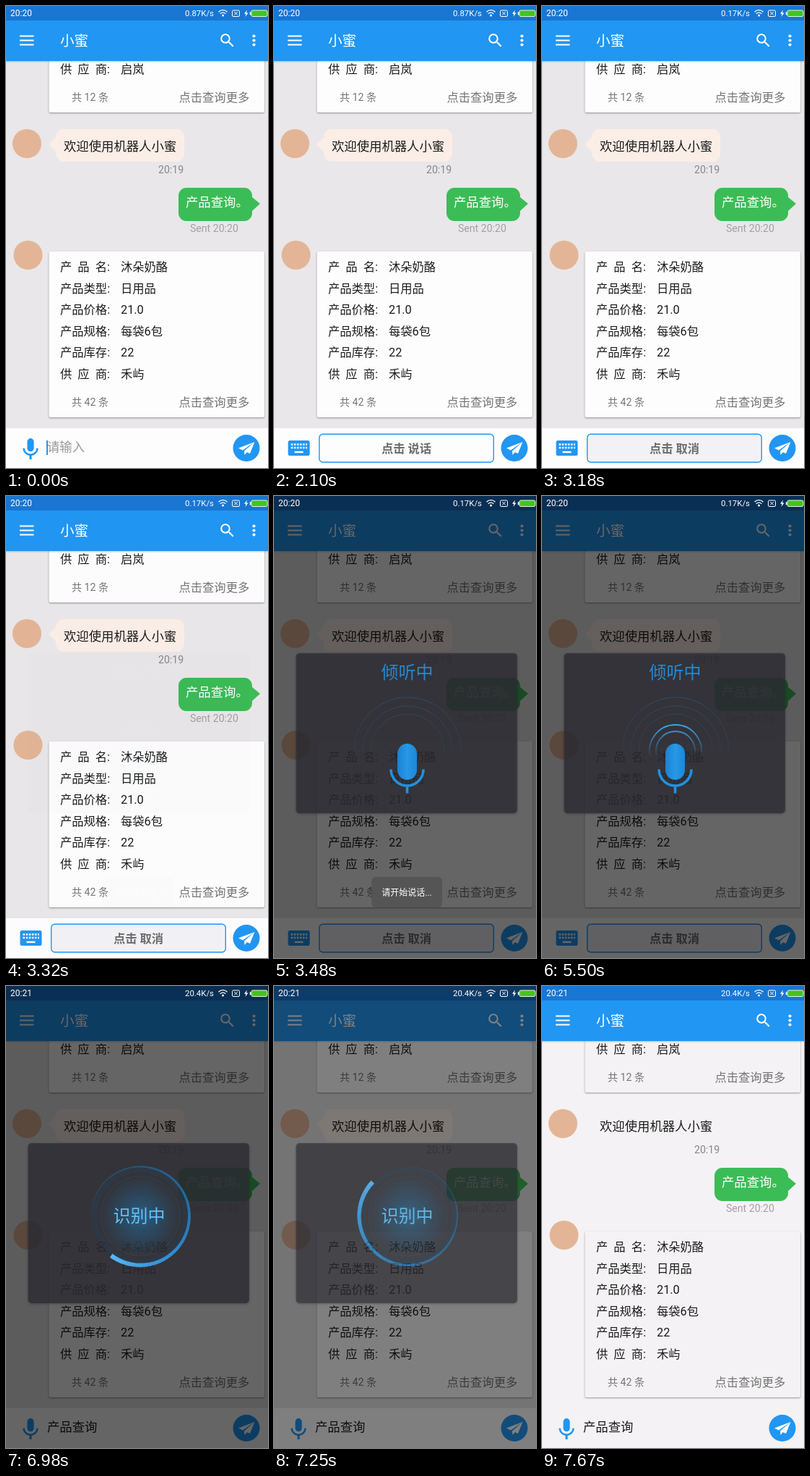
These frames come from a looping animation (363x638 px, 8000 ms). An HTML page:

```html
<!DOCTYPE html>
<html lang="zh-CN">
<head>
<meta charset="utf-8">
<title>小蜜</title>
<style>
html, body { margin: 0; width: 100%; height: 100%; overflow: hidden; }
svg { display: block; --bg: #e9e7e9; --card: #fdfdfe; --bubble: #faeee7; }
svg.pale { --bg: #f4f2f4; --card: #f4f2f4; --bubble: #f4f2f4; }
text { font: 16.3px Roboto, "Noto Sans CJK SC", "Noto Sans CJK", sans-serif; fill: #1c1c1c; white-space: pre; }
.bg { fill: var(--bg); }
.card { fill: var(--card); }
.cards { filter: drop-shadow(0 1px 1px rgba(0,0,0,.38)); }
.bubble { fill: var(--bubble); }
.grey { fill: #757575; }
.s14 { font-size: 14.1px; }
.s17 { font-size: 17.35px; }
.mid { text-anchor: middle; }
.blue { fill: #2196f3; }
.white { fill: #fff; }
.stat { font-size: 12px; fill: #fff; }
.head { font-size: 24px; font-weight: 300; }
.line { fill: none; stroke: #fff; }
</style>
</head>
<body>
<svg id="stage" width="363" height="638" viewBox="0 0 363 638">
  <defs>
    <linearGradient id="micFill"><stop stop-color="#1c80d0"/><stop offset=".5" stop-color="#2798e6"/><stop offset="1" stop-color="#1c86d8"/></linearGradient>
    <linearGradient id="fadeIn" gradientUnits="userSpaceOnUse" x1="0" y1="314" x2="0" y2="362"><stop stop-color="#3fa8ee"/><stop offset="1" stop-color="#3fa8ee" stop-opacity="0"/></linearGradient>
    <linearGradient id="fadeOut" gradientUnits="userSpaceOnUse" x1="0" y1="277" x2="0" y2="356"><stop stop-color="#1f6cab"/><stop offset="1" stop-color="#1f6cab" stop-opacity=".3"/></linearGradient>
    <radialGradient id="glow"><stop stop-color="#2383c4" stop-opacity=".55"/><stop offset=".5" stop-color="#1f6b9f" stop-opacity=".35"/><stop offset="1" stop-color="#1f6b9f" stop-opacity="0"/></radialGradient>
  </defs>

  <rect class="bg" width="363" height="638"/>
  <g class="cards">
    <rect class="card" x="59.5" y="60" width="298.5" height="87" rx="2"/>
    <rect class="card" x="59.5" y="339" width="298.5" height="229" rx="2"/>
  </g>
  <g id="rows"></g>

  <g fill="#e3b596"><circle cx="29" cy="190" r="20"/><circle cx="30.5" cy="344" r="20"/></g>
  <path class="bubble" d="M80 170H236a11 11 0 0 1 11 11V204a11 11 0 0 1-11 11H80a11 11 0 0 1-11-11V201L59 191L69 181a11 11 0 0 1 11-11Z"/>
  <text class="s17" x="80" y="200">欢迎使用机器人小蜜</text>
  <text class="s14" x="211" y="231" style="fill:#888">20:19</text>
  <path fill="#3cbc56" d="M250 251H330a11 11 0 0 1 11 11V264L352 273L341 283V286a11 11 0 0 1-11 11H250a11 11 0 0 1-11-11V262a11 11 0 0 1 11-11Z"/>
  <text class="s17 white" x="249" y="277">产品查询。</text>
  <text class="s14" x="255" y="312" style="fill:#a2a0a2">Sent 20:20</text>

  <g style="filter:drop-shadow(0 1px 1px rgba(0,0,0,.2))"><rect class="blue" width="363" height="76"/></g>
  <rect width="363" height="20" fill="#1976d2"/>
  <path class="line" stroke-width="2.2" d="M19 41.5H38.5M19 47.5H38.5M19 53.5H38.5"/>
  <text class="white" x="75" y="54.5" style="font-size:19.6px">小蜜</text>
  <path class="white" transform="translate(294 35) scale(1.05)" d="M15.5 14h-.79l-.28-.27A6.5 6.5 0 0 0 16 9.5 6.5 6.5 0 1 0 9.5 16c1.61 0 3.09-.59 4.23-1.57l.27.28v.79l5 4.99L20.49 19zm-6 0a4.5 4.5 0 1 1 0-9 4.5 4.5 0 0 1 0 9z"/>
  <g class="white"><circle cx="343.5" cy="41.5" r="2.1"/><circle cx="343.5" cy="47.5" r="2.1"/><circle cx="343.5" cy="53.5" r="2.1"/></g>

  <rect class="card" y="583" width="363" height="55"/>
  <g id="typeBar">
    <path class="blue" transform="translate(15.8 594) scale(1.52)" d="M12 14a3 3 0 0 0 3-3V5a3 3 0 0 0-6 0v6a3 3 0 0 0 3 3zm5.3-3c0 3-2.54 5.1-5.3 5.1S6.7 14 6.7 11H5c0 3.41 2.72 6.23 6 6.72V21h2v-3.28c3.28-.48 6-3.3 6-6.72z"/>
    <text id="field" class="s17" x="57" y="615"></text>
    <rect id="caret" class="blue" x="56" y="600" width="2" height="20"/>
  </g>
  <g id="talkBar">
    <rect class="blue" x="19.5" y="600" width="30" height="21" rx="2.5"/>
    <path class="line" stroke-width="2.6" stroke-dasharray="2.6 1.5" d="M23.5 605.5H46M23.5 610H46"/>
    <path class="line" stroke-width="2.4" d="M28.5 616H40.5"/>
    <rect id="button" x="62.7" y="591.2" width="241.6" height="38.8" rx="5" stroke="#2196f3" stroke-width="1.4"/>
    <text id="label" class="mid" x="183.5" y="616.5" style="font-weight:600;fill:#6c6c6c"></text>
  </g>
  <circle class="blue" cx="333" cy="610.5" r="18.5"/>
  <path class="white" d="M344.5 602L322 610.5L328 613.5ZM344.5 602L330 614.5L330.5 620L333.8 616.3L338 618Z"/>

  <rect id="dim" width="363" height="638"/>

  <text id="clock" class="stat" x="6" y="14.3"></text>
  <text id="speed" class="stat" x="288" y="14.3" text-anchor="end" style="font-size:11.4px"></text>
  <path class="line" stroke-width="1.3" d="M294.5 8.2a8.5 8.5 0 0 1 12 0M296.7 10.7a5.5 5.5 0 0 1 7.6 0"/>
  <circle class="white" cx="300.5" cy="13" r="1.5"/>
  <rect class="line" x="313.5" y="6" width="10" height="8.5" rx="1.5"/>
  <path class="line" d="M316.3 8l4.4 4.4M320.7 8l-4.4 4.4"/>
  <path class="white" d="M334 5.5l-4 5.2h2.5l-1 4.2 4-5.4H333Z"/>
  <rect x="340" y="6" width="22" height="8.5" rx="2" fill="#45c31e" stroke="#e6f2e2"/>
  <rect class="white" x="337.8" y="8.3" width="1.7" height="4"/>

  <g id="dialog">
    <rect x="30.5" y="217" width="306.5" height="221" rx="5" fill="#2f3037" fill-opacity=".77" style="filter:drop-shadow(0 1px 1.5px rgba(0,0,0,.4))"/>
    <g id="listen">
      <text class="mid head" x="184.5" y="251.7" style="fill:#2589d2">倾听中</text>
      <g id="outer" fill="none" stroke="url(#fadeOut)" opacity=".45"></g>
      <g id="inner" fill="none" stroke="url(#fadeIn)" stroke-width="1.8"></g>
      <rect x="171" y="342" width="27" height="50" rx="13.5" fill="url(#micFill)"/>
      <path fill="none" stroke="#2290e0" stroke-width="3.6" d="M162 377.5a22.5 22.5 0 0 0 45 0M184.5 400V410.5"/>
    </g>
    <g id="recog">
      <circle cx="186" cy="317.5" r="56" fill="url(#glow)"/>
      <circle cx="186" cy="317.5" r="55" fill="none" stroke="#2d5a78" stroke-opacity=".35"/>
      <circle cx="186" cy="317.5" r="63" fill="none" stroke="#24445c" stroke-opacity=".3" stroke-width="7"/>
      <g id="comet" fill="none"></g>
      <text class="mid head" x="184.5" y="325.7" style="fill:#62c4f6">识别中</text>
    </g>
  </g>
  <g id="toast">
    <rect x="135" y="526" width="98" height="42" rx="6" fill="#555" fill-opacity=".95"/>
    <text class="mid white" x="184" y="551.5" style="font-size:12px">请开始说话...</text>
  </g>
</svg>
<script>
const $ = id => document.getElementById(id);
const LOOP = 8000;

const put = (x, y, s, cls = "") => `<text class="${cls}" x="${x}" y="${y}">${s}</text>`;
const row = (y, key, val) => put(75, y, key + ":") + put(159, y, val);
const foot = (y, n) => put(91, y - 1, `共 ${n} 条`, "grey s14") + put(239.5, y, "点击查询更多", "grey");
const supplier = "供  应  商";
$("rows").innerHTML = row(93, supplier, "启岚") + foot(132, 12) + [
  ["产  品  名", "沐朵奶酪"], ["产品类型", "日用品"], ["产品价格", "21.0"],
  ["产品规格", "每袋6包"], ["产品库存", "22"], [supplier, "禾屿"]
].map(([k, v], i) => row(366 + i * 29.6, k, v)).join("") + foot(553, 42);

// Clockwise arc, angles in degrees
function arc(cx, cy, r, from, to, extra = "") {
  const at = a => `${cx + r * Math.cos(a * Math.PI / 180)} ${cy + r * Math.sin(a * Math.PI / 180)}`;
  return `<path d="M${at(from)}A${r} ${r} 0 ${to - from > 180 ? 1 : 0} 1 ${at(to)}" ${extra}/>`;
}
$("outer").innerHTML = [74, 62, 51].map(r => arc(185, 352, r, 178, 362)).join("");
$("inner").innerHTML = [36, 27].map(r => arc(185, 352, r, 165, 375)).join("");

// Comet head at 0 degrees, tail thinning and darkening behind it
let tail = "";
for (let i = 0; i < 70; i++) {
  const k = 1 - i / 70;
  const style = `stroke="hsl(205 95% ${52 + 14 * k ** 3}%)" opacity="${k ** 1.2}"`;
  tail += arc(186, 317.5, 68, -5 * i - 5.3, -5 * i, `stroke-width="${1 + 5 * k ** 1.4}" ${style}`);
}
$("comet").innerHTML = tail;

const ramp = (t, a, b) => Math.min(1, Math.max(0, (t - a) / (b - a)));
const show = (id, on) => $(id).style.display = on ? "" : "none";
const fade = (id, v) => { $(id).style.opacity = v; show(id, v > 0); };
const say = (id, s) => { if ($(id).textContent !== s) $(id).textContent = s; };

function draw(t) {
  const talking = t >= 1800 && t < 6560;
  const pressed = t >= 2700;
  const done = t >= 6560;

  show("talkBar", talking);
  show("typeBar", !talking);
  show("caret", t < 280 || t >= 740 && t < 1190 || t >= 1650 && t < 1800);
  say("field", done ? "产品查询" : "请输入");
  $("field").style.fill = done ? "#1c1c1c" : "#999";
  say("label", pressed ? "点击 取消" : "点击 说话");
  $("button").style.fill = pressed ? "#f2f2f6" : "#fdfdfe";
  say("clock", done ? "20:21" : "20:20");
  say("speed", done ? "20.4K/s" : t >= 2560 ? "0.17K/s" : "0.87K/s");

  const open = ramp(t, 3320, 3480) * (1 - ramp(t, 7220, 7400));
  fade("dim", open * 0.6);
  fade("dialog", open);
  fade("toast", ramp(t, 3320, 3480) * (1 - ramp(t, 5080, 5260)));

  show("listen", t < 6320);
  show("recog", t >= 6320);
  const voice = Math.min(t, 5770) - 3480;
  $("inner").style.opacity = 0.5 - 0.5 * Math.cos(2 * Math.PI * voice / 808);
  const spin = t > 6560 && t < 6830 ? 6560 : t;
  $("comet").setAttribute("transform", `rotate(${126 + (spin - 6980) * 0.36} 186 317.5)`);

  $("stage").classList.toggle("pale", t >= 7400);
}

const start = performance.now();
function tick() {
  draw((performance.now() - start) % LOOP);
  requestAnimationFrame(tick);
}
tick();
</script>
</body>
</html>
```
